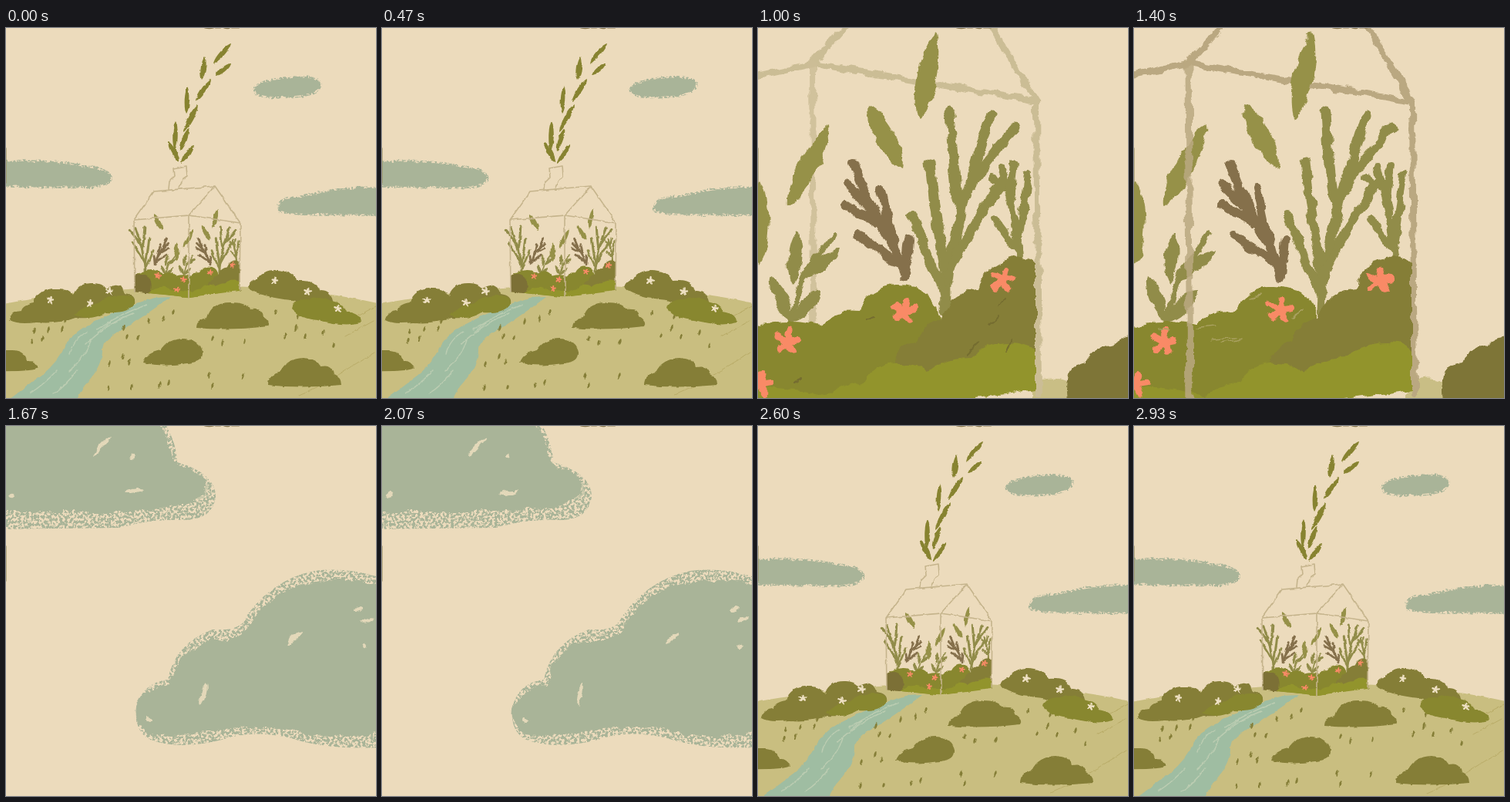
An HTML page that plays this animation: 480x480 px, repeating every 2.99 s.

```html
<!DOCTYPE html>
<html lang="en">
<head>
<meta charset="utf-8">
<title>Greenhouse on a hill</title>
<style>
html, body { margin: 0; width: 100%; height: 100%; overflow: hidden; background: #ecdbbc; }
svg { display: block; width: 100vw; height: 100vh; }
</style>
</head>
<body>
<svg id="stage" viewBox="0 0 480 480"></svg>
<script>
const LOOP = 2990, STEPS = 45;
const PAPER = '#ecdbbc', DARK = '#857e37', GREEN = '#88872f', BRIGHT = '#92942c',
  TWIG = '#918c49', BROWN = '#85704b', CORAL = '#f98a66', MIST = '#a9b498', WIRE = '#c5b48c';

const fill = (d, color, extra = '') => `<path d="${d}" fill="${color}" ${extra}/>`;
const line = (d, color, width, extra = '') =>
  `<path d="${d}" fill="none" stroke="${color}" stroke-width="${width}" stroke-linecap="round" stroke-linejoin="round" ${extra}/>`;
const group = (content, attrs) => `<g ${attrs}>${content}</g>`;

function leaf(x1, y1, x2, y2, width, color) {
  const dx = x2 - x1, dy = y2 - y1, len = Math.hypot(dx, dy);
  const nx = -dy / len * width, ny = dx / len * width;
  const bend = side => [.2, .8].map(t => `${x1 + dx * t + nx * side} ${y1 + dy * t + ny * side}`);
  const [a, b] = bend(.62), [c, d] = bend(-.62);
  return fill(`M${x1} ${y1}C${a} ${b} ${x2} ${y2}C${d} ${c} ${x1} ${y1}`, color);
}
const leaves = (list, width, color) => list.map(p => leaf(...p, width, color)).join('');

function flower(x, y, r, color) {
  let d = '';
  for (let i = 0; i < 5; i++) {
    const a = i * Math.PI * .4 - 1.4;
    d += `M${x} ${y}l${(r * Math.cos(a)).toFixed(2)} ${(r * Math.sin(a)).toFixed(2)}`;
  }
  return line(d, color, r * .6);
}

// Crayon wobble, and a speckled grain for cloud rims
const wobble = (id, seed, freq, scale) => `
  <filter id="${id}${seed}" filterUnits="userSpaceOnUse" x="-20" y="-20" width="520" height="520" color-interpolation-filters="sRGB">
    <feTurbulence type="fractalNoise" baseFrequency="${freq}" numOctaves="4" seed="${seed + 3}"/>
    <feDisplacementMap in="SourceGraphic" scale="${scale}" xChannelSelector="R" yChannelSelector="G"/>
  </filter>`;
const grain = seed => `
  <filter id="grain${seed}" filterUnits="userSpaceOnUse" x="-20" y="-20" width="520" height="520" color-interpolation-filters="sRGB">
    <feTurbulence type="fractalNoise" baseFrequency=".3" numOctaves="3" seed="${seed + 8}"/>
    <feColorMatrix values="0 0 0 0 0  0 0 0 0 0  0 0 0 0 0  9 0 0 0 -3.9"/>
    <feComposite in="SourceGraphic" operator="in"/>
  </filter>`;

// Greenhouse contents, in close-up coordinates
const tallPlant =
  line('M243 368Q246 325 239 292Q228 230 223 174M243 345Q246 310 256 276Q264 225 276 195L301 113M259 222Q253 180 249 110M262 228Q280 190 334 129', TWIG, 13) +
  line('M246 318Q275 260 318 198M241 340Q220 300 200 243', TWIG, 12);
const brownPlant = line('M191 322Q172 280 160 208M174 278Q146 235 124 176M152 241L115 202M154 252L113 229M186 308L129 267M191 320L196 275', BROWN, 12);
const sidePlant = line('M339 296Q334 240 316 182M339 276L350 190M338 290L307 249M328 222L333 176M322 208L302 194', TWIG, 10);
const smallPlant = line('M42 380Q50 350 60 318L98 268', TWIG, 7) +
  leaves([[42, 380, 17, 322], [46, 332, 51, 264], [53, 326, 107, 287], [43, 381, 82, 340]], 19, TWIG);

const plants =
  group(tallPlant + brownPlant, 'transform="translate(70) scale(-1 1)"') +
  group(smallPlant, 'transform="translate(-103)"') +
  brownPlant + sidePlant + tallPlant + smallPlant +
  leaves([[231, 6, 208, 119], [143, 100, 188, 183], [94, 125, 38, 231], [2, 198, 2, 307], [-126, 40, -78, 127]], 27, '#969148');

const shrubs =
  fill('M-235 475V385Q-140 330 -80 372Q-30 350 0 386Q40 376 82 386Q96 364 130 368Q145 335 182 334Q225 334 236 372L250 480L70 506Z', GREEN) +
  fill('M178 432Q180 412 204 408Q214 380 238 377Q252 340 286 338Q300 298 340 297Q352 297 360 306V470L180 480Z', DARK) +
  fill('M-235 476V385Q-180 360 -150 400Q-130 440 -150 486Z', '#7c7036') +
  fill('M-160 484Q-80 420 -20 470Q20 460 92 478Q110 460 138 460Q155 432 186 435Q214 436 220 449Q238 428 276 428Q295 408 328 408Q350 408 360 420V470L70 507Z', BRIGHT) +
  [[38, 407], [190, 366], [318, 327], [3, 462], [-104, 388]].map(([x, y]) => flower(x, y, 14, CORAL)).join('');

const bush = (d, color = DARK) => fill(d, color);

function wideScene(pose) {
  const clouds = ['M-20 175Q60 171 100 180Q137 184 136 196Q130 206 100 206L-20 204Z',
    'M500 208Q440 206 405 215Q385 221 362 222Q352 230 355 237Q375 243 500 241Z',
    'M322 80Q328 69 360 66Q400 61 407 72Q409 82 385 87Q340 92 325 85Z'];
  const ticks = [36, 393, 55, 391, 73, 390, 34, 406, 48, 403, 77, 380, 153, 389, 157, 400, 172, 402, 205, 377,
    217, 369, 152, 426, 134, 436, 160, 433, 185, 381, 163, 466, 133, 467, 199, 463, 211, 460, 268, 403, 281, 408, 264, 451,
    268, 464, 309, 407, 307, 452, 376, 389, 388, 400, 362, 399, 412, 395, 425, 412, 350, 369, 379, 374];
  let grass = '';
  for (let i = 0; i < ticks.length; i += 2) {
    const x = ticks[i], y = ticks[i + 1];
    grass += leaf(x - 1, y + 4, x + 1, y - 4, 3.2, DARK);
  }
  const sky = clouds.map(d => line(d, MIST, 5, `filter="url(#grain${pose})"`) + fill(d, MIST)).join('');
  const hill = fill('M-20 361Q110 336 235 335Q380 332 500 361V500H-20Z', '#c9be80') +
    line('M455 374L480 361M440 400L477 380M430 450L478 421M380 476L415 461', '#b9ac68', 1);
  const river = fill('M192 350Q150 362 105 386Q81 399 73 420Q60 442 36 458L-20 500H82L101 465Q124 440 125 420Q123 408 145 395Q177 376 213 349Z', '#9fbda2') +
    line('M183 359Q150 370 118 391M165 370Q130 384 103 410M105 394Q88 404 83 423M110 405Q104 425 82 445M66 444Q50 462 31 474M92 444Q78 464 61 474M135 382L119 394', '#bccdb2', 1.4);
  const bushes =
    bush('M4 379Q8 367 20 367Q20 359 36 356Q42 338 64 338Q80 337 87 347Q92 330 114 331Q125 331 130 338Q150 327 154 345Q169 347 167 358Q158 370 128 367Q118 378 90 376Q70 384 40 382Q15 385 4 379Z') +
    bush('M88 372Q100 360 120 357Q130 347 150 347Q168 346 167 358Q158 371 130 369Q110 381 88 372Z', GREEN) +
    bush('M314 337Q316 329 326 326Q331 314 350 314Q370 314 377 328Q400 326 408 341Q421 341 424 354Q430 366 400 364L370 353Q330 349 314 337Z') +
    bush('M370 364Q372 352 392 352Q405 345 422 354Q439 357 442 368Q460 370 460 382Q440 388 405 379Q383 378 370 364Z', GREEN) +
    bush('M247 389Q247 378 261 376Q266 356 291 356Q312 356 317 365Q333 363 334 374Q344 380 340 387Q290 393 247 389Z') +
    bush('M178 434Q182 421 201 418Q210 403 231 403Q252 404 255 420Q256 432 242 434Q205 441 178 434Z') +
    bush('M340 463Q340 450 355 447Q363 429 386 428Q405 429 408 440Q424 437 425 449Q435 453 435 463Q380 468 340 463Z') +
    bush('M-20 418H8Q24 418 27 432Q40 431 42 441Q38 446 -20 445Z');
  const blooms = [[58, 353], [109, 357], [134, 341], [348, 328], [391, 342], [431, 364]]
    .map(([x, y]) => flower(x, y, 4, '#eee0c2')).join('');
  const house = group(plants + shrubs, 'transform="translate(221 232.7) scale(.23)"');
  const frame = line('M167 342L166 249L192 212L271 205L304 253L303 340M166 249L237 243L304 253M271 205L237 243V349M211 209L212 199L218 193L217 182L234 179L235 193L229 197L225 207', WIRE, 1.6);
  const smoke = leaves([[269, 46, 292, 20], [272, 62, 291, 46], [254, 67, 258, 37], [246, 96, 266, 66],
    [234, 111, 236, 75], [230, 135, 249, 99], [219, 159, 220, 121], [226, 160, 237, 130],
    [225, 174, 210, 147], [227, 176, 244, 151]], 7, '#878330');
  return group(sky + hill + river + grass + bushes + blooms + house + frame + smoke, `filter="url(#fine${pose})"`);
}

function closeScene(pose) {
  const rods = line('M-20 66L70 46L361 95L364 474M70 46L122 -12M296 -12L361 95', pose ? '#cbbd95' : '#baa881', 8);
  const post = line('M70 46L73 500', pose ? '#cdbe97' : '#baa881', pose ? 8 : 9, 'opacity=".85"');
  const ground = fill('M355 500V460Q395 448 414 468L425 500Z', '#c9be85') +
    fill('M404 500Q390 438 424 434Q435 414 458 411Q470 396 500 399V500Z', '#7e7537');
  const marks = pose
    ? line('M300 385L310 374M322 420L328 405M270 425L286 410M310 360L318 350M45 460L56 455M140 376L150 372', '#756d30', 2)
    : line('M80 391L108 388M100 404L130 402M112 409L141 403M150 349L166 346M205 376L220 367M30 390L45 393', '#aaa160', 1.5);
  return group(ground + rods + (pose ? post : '') + plants + shrubs + marks + (pose ? '' : post), `filter="url(#rough${pose})"`);
}

function cloudScene(pose) {
  const rims = fill('M-20 -20H196Q222 18 222 47Q272 61 272 92Q268 120 235 122Q185 120 150 132L-20 134Z', MIST) +
    fill('M187 407Q166 396 169 365Q177 333 210 329Q219 282 268 264Q295 266 305 257Q340 200 400 188Q450 182 500 202V416Q420 422 370 405Q320 393 280 407Q225 421 187 407Z', MIST);
  const cores = fill('M-20 -20H184Q214 14 217 48Q262 62 258 82Q252 103 200 106L165 111H-20Z', MIST) +
    fill('M186 399Q168 390 171 366Q177 340 214 335Q222 290 265 279Q300 279 310 264Q345 210 402 203Q450 194 500 210V391Q440 412 375 396Q320 384 275 394Q220 405 186 399Z', MIST);
  const nicks = leaves([[112, 39, 135, 13], [151, 88, 177, 83], [366, 284, 384, 266], [254, 361, 260, 334],
    [162, 42, 166, 36], [3, 91, 11, 92], [463, 255, 475, 249], [453, 240, 461, 236], [183, 377, 187, 384], [462, 288, 466, 282]], 6, '#e3d8b9');
  const fleck = line('M260 76Q262 89 250 94', '#c8c8aa', 2);
  return group(rims, `filter="url(#grain${pose})"`) + group(cores + nicks + fleck, `filter="url(#rough${pose})"`);
}

const edges = line('M258 -.5Q264 1 269 -.5M272 -.5H278M283 -.5Q287 1 290 -.5M293 -.5H302', '#8b7a52', 2) +
  line('M0 156V201', '#a1986b', 1.4);

const stage = document.getElementById('stage');
const scenes = [wideScene, closeScene, cloudScene];
const defs = [0, 1].map(s => wobble('fine', s, .09, 4) + wobble('rough', s, .05, 11) + grain(s)).join('');
stage.innerHTML = `<defs>${defs}</defs><rect width="480" height="480" fill="${PAPER}"/>` +
  scenes.map(draw => [0, 1].map(pose => group(draw(pose), 'class="view" display="none"')).join('')).join('') + edges;
const views = [...stage.querySelectorAll('.view')];

let shown = -1;
function play() {
  const step = Math.floor(performance.now() % LOOP / LOOP * STEPS);
  const scene = step < 15 || step >= 34 ? 0 : step < 25 ? 1 : 2;
  const next = scene * 2 + (step >> 1) % 2;
  if (next !== shown) {
    views.forEach((view, i) => view.setAttribute('display', i === next ? 'inline' : 'none'));
    shown = next;
  }
  requestAnimationFrame(play);
}
play();
</script>
</body>
</html>
```
